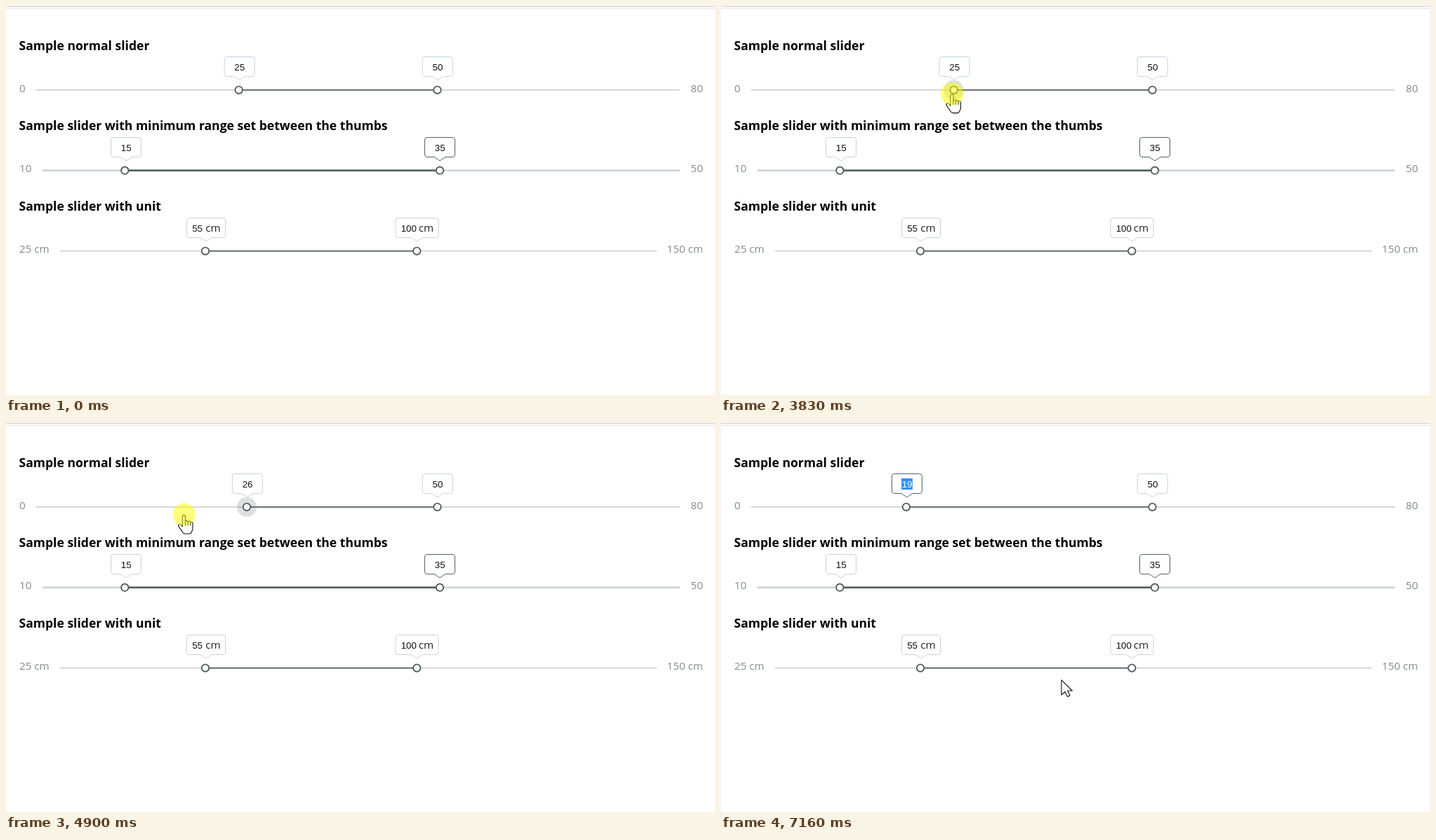
An HTML page for the animation above (8 s loop, 1010 by 555 pixels).

```html
<!DOCTYPE html>
<html lang="en">
<head>
<meta charset="utf-8">
<title>Range sliders</title>
<style>
  html, body { margin: 0; width: 100%; height: 100%; overflow: hidden; background: #fff; }
  svg { display: block; width: 100%; height: 100%; }
  .title { font: 700 17.56px "Open Sans", "Noto Sans", sans-serif; fill: #000; }
  .limit, .unit { font: 400 15.23px "Open Sans", "Noto Sans", sans-serif; }
  .limit { fill: #7f8c8d; }
  .unit { fill: #222; }
  .value { font: 13.33px "Liberation Sans", Arial, sans-serif; fill: #111; }
  .end { text-anchor: end; }
  .mid { text-anchor: middle; }
  .track { fill: #cfd1d1; }
  .range { fill: #525e60; }
  .thumb { fill: #fff; stroke: #525e60; stroke-width: 1.9; }
  .halo { fill: #4e6264; opacity: .2; }
  .box { fill: #fff; stroke: #c6d3e0; }
  .box.focus { stroke: #566163; }
  .pointer { fill: #fff; stroke: #111; stroke-width: 1.1; stroke-linejoin: round; stroke-linecap: round; }
</style>
</head>
<body>
<svg id="stage" viewBox="0 0 1010 555" xmlns="http://www.w3.org/2000/svg"></svg>
<script>
const LOOP = 8000, STEP = 67;
const ROW = 114.9, TRACK_Y = 119.8;
const stage = document.getElementById('stage');

// Value bubble with a tail, centred on x = 0
function bubble(w, top) {
  const h = w / 2, r = 3.5, low = top + 28;
  return `M${r - h} ${top}H${h - r}Q${h} ${top} ${h} ${top + r}V${low - r}Q${h} ${low} ${h - r} ${low}` +
    `H8L0 ${low + 5.4}L-8 ${low}H${r - h}Q${-h} ${low} ${-h} ${low - r}V${top + r}Q${-h} ${top} ${r - h} ${top}Z`;
}

const bar = (cls, x1, x2, y, h) =>
  `<rect class="${cls}" x="${x1}" y="${y - h / 2}" width="${x2 - x1}" height="${h}"/>`;

const sliders = [
  { title: 'Sample normal slider', min: '0', max: '80', track: [42.5, 960], weight: 1.7,
    thumbs: [{ x: 331.7, tip: 332.6, value: 25 }, { x: 614.5, tip: 614.7, value: 50 }] },
  { title: 'Sample slider with minimum range set between the thumbs', min: '10', max: '50',
    track: [51.5, 960], weight: 2.6,
    thumbs: [{ x: 169.3, tip: 171, value: 15 }, { x: 618, tip: 618, value: 35, focus: true }] },
  { title: 'Sample slider with unit', min: '25 cm', max: '150 cm', unit: 'cm',
    track: [77, 927], weight: 1.7,
    thumbs: [{ x: 284, tip: 285, value: 55, w: 55 }, { x: 585.3, tip: 585.5, value: 100, w: 61 }] }
];

function tipMarkup({ tip, value, w = 43, focus }, unit, dy) {
  const base = 92 + dy;
  const text = unit
    ? `<text class="value" x="${7.7 - w / 2}" y="${base}">${value}</text>
       <text class="unit end" x="${w / 2 - 6.8}" y="${base + .3}">${unit}</text>`
    : `<rect class="sel" x="-7.8" y="${79 + dy}" width="15.8" height="16" fill="#338fff" visibility="hidden"/>
       <text class="value mid" x=".2" y="${base}">${value}</text>`;
  return `<g class="tip" transform="translate(${tip})">
    <path class="box${focus ? ' focus' : ''}" d="${bubble(w, Math.round(72 + dy) + .5)}"/>${text}</g>`;
}

function sliderMarkup(s, i) {
  const dy = i * ROW, y = TRACK_Y + dy;
  const [a, b] = s.thumbs;
  return `<text class="title" x="18.5" y="${62.8 + i * 114.6}">${s.title}</text>
    <text class="limit" x="19" y="${122.5 + dy}">${s.min}</text>
    <text class="limit end" x="993" y="${122.5 + dy}">${s.max}</text>
    ${bar('track', ...s.track, y, s.weight)}
    ${bar('range', a.x, b.x, y, s.weight)}
    ${i ? '' : `<circle class="halo" cy="${y}" r="14"/>`}
    ${s.thumbs.map(t => `<circle class="thumb" cx="${t.x}" cy="${y}" r="5.2"/>`).join('')}
    ${s.thumbs.map(t => tipMarkup(t, s.unit, dy)).join('')}`;
}

stage.innerHTML = `
  <rect width="1010" height="1" fill="#cbcbcb"/>
  <rect y="2.6" width="1010" height="1" fill="#dcdcdc"/>
  ${sliders.map(sliderMarkup).join('')}
  <g id="cursor">
    <path id="arrow" class="pointer" d="M0 .6V22L5 17.4L8.6 24.6L12 23L8.7 16H15.4Z"/>
    <path id="beam" d="M-5.5 -9.5H-1.2L0 -8.6L1.2 -9.5H5.5M0 -8.6V8.6M-5.5 9.5H-1.2L0 8.6L1.2 9.5H5.5"
      fill="none" stroke="#111" stroke-width="1.4"/>
    <g id="hand" class="pointer">
      <path d="M-2.4 17V3Q-2.2 .8 -.4 .8Q1.6 .8 1.7 3V10Q2 8.4 3.6 8.5Q5.2 8.7 5.3 10.6Q5.8 9.2 7.3 9.4
        Q8.8 9.7 8.9 11.6Q9.4 10.4 10.7 10.7Q12.3 11.2 12.3 13.2V19Q12.3 22 11 24Q10 27.4 7.6 27.4H1
        Q-1 27.4 -2.4 24.8L-7.6 17.2Q-9 15 -7.6 14Q-6 13 -4.3 15Z"/>
      <path fill="none" d="M1.7 10V15M5.3 10.6V15M8.9 11.6V15"/>
    </g>
    <circle id="press" r="16.2" fill="#ff0" opacity=".5"/>
  </g>`;

// The first match of each class belongs to the slider that moves
const pick = s => stage.querySelector(s);
const show = (node, on) => node.setAttribute('visibility', on ? 'visible' : 'hidden');
const [cursor, press, halo, thumb, range, tip, box, sel] =
  ['#cursor', '#press', '.halo', '.thumb', '.range', '.tip', '.box', '.sel'].map(pick);
const label = tip.querySelector('.value');
const pointers = { arrow: pick('#arrow'), beam: pick('#beam'), hand: pick('#hand') };

const smooth = u => (1 - Math.cos(Math.PI * u)) / 2;
const speedUp = u => u ** 1.6;
const within = (t, a, b) => t >= a && t < b;

// Cursor strokes: where each one ends, and when it starts and ends
const origin = { x: 960, y: 590 };
const strokes = [
  { from: 393, to: 740, x: 639, y: 429 },
  { from: 943, to: 1210, x: 152, y: 295 },
  { from: 1343, to: 1610, x: 120.5, y: 50.7 },
  { from: 1870, to: 2220, x: 368, y: 103 },
  { from: 2404, to: 2820, x: 328.5, y: 133 },
  { from: 2820, to: 3160, x: 337, y: 125 },
  { from: 3763, to: 4380, x: 66, y: 132, ease: speedUp },
  { from: 4380, to: 4766, x: 377, y: 142 },
  { from: 4766, to: 4995, x: 182, y: 124 },
  { from: 5095, to: 5430, x: 216.5, y: 119 },
  { from: 5443, to: 5770, x: 265, y: 127 },
  { from: 5883, to: 6480, x: 272, y: 85 },
  { from: 6860, to: 7160, x: 485, y: 366 }
];
const grab = 3763, release = 5950;

// Movement is seen in even steps, counted from the start of its stroke
function snap(t) {
  const s = strokes.find(s => within(t, s.from, s.to));
  return s ? s.from + Math.floor((t - s.from + 8) / STEP) * STEP : t;
}

function cursorAt(t) {
  let pos = origin;
  for (const s of strokes) {
    if (t < s.from) break;
    const k = (s.ease || smooth)(Math.min(1, (t - s.from) / (s.to - s.from)));
    pos = { x: pos.x + (s.x - pos.x) * k, y: pos.y + (s.y - pos.y) * k };
  }
  return pos;
}

// The thumb follows the dragging cursor one step late
function valueAt(t) {
  const late = Math.min(Math.max(t - STEP, grab), 5800);
  return Math.round((cursorAt(late).x - 49.2) / 11.3);
}

function pointerFor({ x, y }, thumbX, tipX, held) {
  if (held || Math.hypot(x - thumbX, y - TRACK_Y) < 12) return 'hand';
  const onTitle = x < 205 && within(y, 45, 70);
  const onTip = Math.abs(x - tipX) < 22 && within(y, 72, 102);
  return onTitle || onTip ? 'beam' : 'arrow';
}

function draw(now) {
  const t = snap(now);
  const pos = cursorAt(t), value = valueAt(t);
  const x = 49.2 + 11.3 * value, tipX = 50.5 + 11.283 * value;
  const held = within(t, 3420, release), selected = t >= 6750;

  thumb.setAttribute('cx', x);
  halo.setAttribute('cx', x);
  range.setAttribute('x', x);
  range.setAttribute('width', 614.5 - x);
  tip.setAttribute('transform', `translate(${tipX})`);
  label.textContent = value;
  label.style.fill = selected ? '#fff' : '';
  box.classList.toggle('focus', t >= 6350);
  show(sel, selected);
  show(halo, within(t, grab + STEP, release));

  const shape = pointerFor(pos, x, tipX, held);
  cursor.setAttribute('transform', `translate(${pos.x} ${pos.y})`);
  for (const name in pointers) show(pointers[name], name === shape);
  show(press, held || within(t, 6630, 6690) || within(t, 6750, 6920));
}

const begin = performance.now();
function tick() {
  draw((performance.now() - begin) % LOOP);
  requestAnimationFrame(tick);
}
draw(0);
requestAnimationFrame(tick);
</script>
</body>
</html>
```
